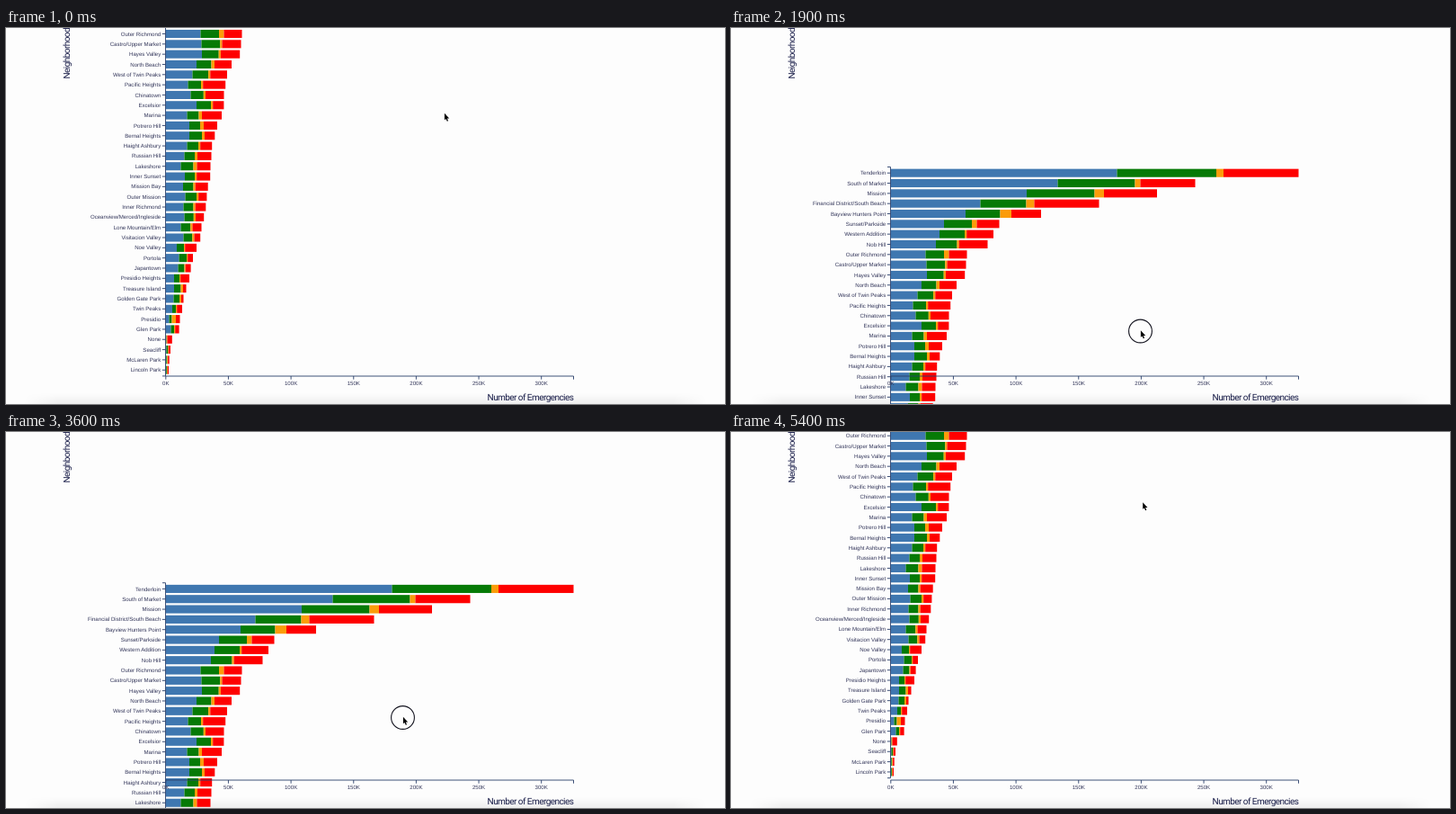
Write an HTML page that moves like this. It is 800 px wide and 418 px high and loops after 5500 ms.

```html
<!DOCTYPE html>
<html lang="en">
<head>
<meta charset="utf-8">
<title>Emergencies by neighborhood</title>
<style>
  html, body { margin: 0; width: 100%; height: 100%; overflow: hidden; background: #fdfdfd; }
  svg { display: block; width: 100%; height: 100%; overflow: hidden; }
  text { text-rendering: geometricPrecision; }
  .tick { font: 6.1px "Liberation Sans", Arial, sans-serif; fill: #33365a; }
  .title { font: 10px Roboto, sans-serif; letter-spacing: -.56px; fill: #181c48; }
  .axis { fill: none; stroke: #2a3f6a; stroke-width: .9; }
</style>
</head>
<body>
<svg id="stage" viewBox="0 0 800 418">
  <defs>
    <linearGradient id="fall" x2="0" y2="1">
      <stop offset="0" stop-color="#000" stop-opacity="0"/>
      <stop offset="1" stop-color="#000" stop-opacity=".06"/>
    </linearGradient>
    <linearGradient id="sides">
      <stop offset="0" stop-color="#000"/>
      <stop offset=".05" stop-color="#fff"/>
      <stop offset=".95" stop-color="#fff"/>
      <stop offset="1" stop-color="#000"/>
    </linearGradient>
    <mask id="ends"><rect x="20" y="406" width="760" height="12" fill="url(#sides)"/></mask>
  </defs>
  <rect x="20" y="406" width="760" height="12" fill="url(#fall)" mask="url(#ends)"/>
</svg>
<script>
const LOOP = 5500, STEP = 100;
const X0 = 177.8, ROW = 11.325, BAR = 9.1, AXIS_Y = 387, RIGHT = 631.5;
const COLORS = ['#3f77b0', '#067a06', '#fb9c0a', '#fe0000'];

// name, blue, green, red, orange (when it differs from the usual width)
const rows = [
  ['Tenderloin', 251.7, 110.5, 83.5, 8],
  ['South of Market', 185.7, 86, 61, 6],
  ['Mission', 151.2, 75.5, 59, 10.5],
  ['Financial District/South Beach', 99.7, 51, 72, 9],
  ['Bayview Hunters Point', 83.2, 38.5, 33, 12.5],
  ['Sunset/Parkside', 59.2, 31, 25, 5.5],
  ['Western Addition', 54.2, 28, 29.8],
  ['Nob Hill', 50.2, 23.5, 31.8],
  ['Outer Richmond', 38.7, 20.5, 20, 5.5],
  ['Castro/Upper Market', 39.7, 20.8, 21],
  ['Hayes Valley', 40.2, 18.7, 21.3],
  ['North Beach', 34.2, 16.5, 19, 3.5],
  ['West of Twin Peaks', 29.7, 17.6, 18.7],
  ['Pacific Heights', 24.7, 14.5, 25],
  ['Chinatown', 27.7, 14.3, 20.5],
  ['Excelsior', 34.2, 16, 12.2],
  ['Marina', 23.7, 13, 22, 3.5],
  ['Potrero Hill', 26.2, 12, 15, 4],
  ['Bernal Heights', 26.2, 14, 11.3, 3],
  ['Haight Ashbury', 23.7, 12.5, 13],
  ['Russian Hill', 20.7, 11.5, 15.5, 3],
  ['Lakeshore', 16.7, 14, 15, 4],
  ['Inner Sunset', 21.2, 11, 15],
  ['Mission Bay', 19.2, 11.5, 14],
  ['Outer Mission', 21.7, 12.5, 9.2],
  ['Inner Richmond', 19.7, 11, 11.6],
  ['Oceanview/Merced/Ingleside', 20.7, 10.3, 9.2],
  ['Lone Mountain/Elm', 16.7, 10.8, 10],
  ['Visitacion Valley', 19.7, 9.8, 6.7],
  ['Noe Valley', 12.2, 8, 12.8],
  ['Portola', 14.7, 8.5, 5.8],
  ['Japantown', 13.7, 7, 5.9],
  ['Presidio Heights', 9.2, 6, 9.8],
  ['Treasure Island', 9.2, 7.5, 3.5, 2.5],
  ['Golden Gate Park', 8.7, 6.5, 2.5, 2],
  ['Twin Peaks', 7.2, 4, 5.8],
  ['Presidio', 3.7, 3, 4.5, 4.5],
  ['Glen Park', 5.7, 3.5, 4.4],
  ['None', .4, .5, 5.3],
  ['Seacliff', .7, 1.5, 2.2],
  ['McLaren Park', .5, 1, 1.6],
  ['Lincoln Park', .4, .8, 1.2]
];

// time, centre of the first row
const scroll = [
  [0, -84.1], [1200, -84.1], [1300, -81], [1400, -72], [1500, -49.7], [1600, 14.6],
  [1800, 121.6], [1900, 161.2], [2000, 171.6], [2400, 225.6], [2500, 230.6],
  [3000, 231], [3400, 212], [3600, 174.4], [3700, 152.1], [4200, -38],
  [4400, -58.4], [4500, -68.4], [4800, -82.5], [5000, -86.4]
];
const pointerX = [
  [0, 487.5], [600, 487.5], [1100, 484.5], [1500, 475.5], [1900, 455.5],
  [2500, 446.5], [3000, 443], [3600, 441.5], [4400, 457.8]
];
const hoverY = [[0, 95.5], [600, 95.5], [1100, 81.3]];
const GRAB = 165.4, LAG = 100, PRESS = 1100, RELEASE = 5100;

const stage = document.getElementById('stage');

function add(parent, tag, attrs, text) {
  const el = document.createElementNS('http://www.w3.org/2000/svg', tag);
  for (const k in attrs) el.setAttribute(k, attrs[k]);
  if (text) el.textContent = text;
  parent.appendChild(el);
  return el;
}

function at(table, t) {
  for (let i = 1; i < table.length; i++) {
    const [t0, a] = table[i - 1], [t1, b] = table[i];
    if (t < t1) return a + (b - a) * (t - t0) / (t1 - t0);
  }
  return table[table.length - 1][1];
}

// Scrolling rows with their axis
const chart = add(stage, 'g', {});
const last = (rows.length - 1) * ROW;
let yTicks = `M174 -6.7H177.5V${last + 6.7}H174`;
rows.forEach(([name, blue, green, red, orange], i) => {
  const y = i * ROW;
  const mid = orange || (i < 29 ? 2.2 : i < 38 ? 1.2 : .8);
  let x = X0;
  [blue, green, mid, red].forEach((width, k) => {
    add(chart, 'rect', { x, y: y - BAR / 2, width, height: BAR, fill: COLORS[k] });
    x += width;
  });
  yTicks += `M173.8 ${y}H177.5`;
  add(chart, 'text', { class: 'tick', x: 172.2, y: y + 2.1, 'text-anchor': 'end' }, name);
});
add(chart, 'path', { class: 'axis', d: yTicks });

// Fixed horizontal axis
let xTicks = `M177.5 ${AXIS_Y}H${RIGHT}v3.7`;
for (let i = 0; i < 7; i++) {
  const x = X0 + i * 69.65;
  xTicks += `M${x} ${AXIS_Y}v3.7`;
  add(stage, 'text', { class: 'tick', x, y: 396.6, 'text-anchor': 'middle' }, i * 50 + 'K');
}
add(stage, 'path', { class: 'axis', d: xTicks });
add(stage, 'text', { class: 'title', x: 631.3, y: 414.3, 'text-anchor': 'end' }, 'Number of Emergencies');
add(stage, 'text', { class: 'title', transform: 'translate(70.7 56.5) rotate(-90)' }, 'Neighborhood');

// Pointer with its press ring
const pointer = add(stage, 'g', {});
const ring = add(pointer, 'circle', { r: 12.9, fill: 'none', stroke: '#14141f', 'stroke-width': 1.1 });
add(pointer, 'path', {
  d: 'M.4 -.7V6.8L2 5.4L3.3 8.3L4.5 7.8L3.3 5H5.7Z',
  fill: '#000', stroke: '#fff', 'stroke-width': .7, 'paint-order': 'stroke'
});

function draw(t) {
  const y = t < PRESS ? at(hoverY, t) : at(scroll, t + LAG) + GRAB;
  chart.setAttribute('transform', `translate(0 ${at(scroll, t)})`);
  pointer.setAttribute('transform', `translate(${at(pointerX, t)} ${y})`);
  ring.setAttribute('visibility', t >= PRESS && t < RELEASE ? 'visible' : 'hidden');
}

const start = performance.now();
function tick() {
  const t = Math.max(0, performance.now() - start) % LOOP;
  draw(Math.floor(t / STEP) * STEP);
  requestAnimationFrame(tick);
}
tick();
</script>
</body>
</html>
```
